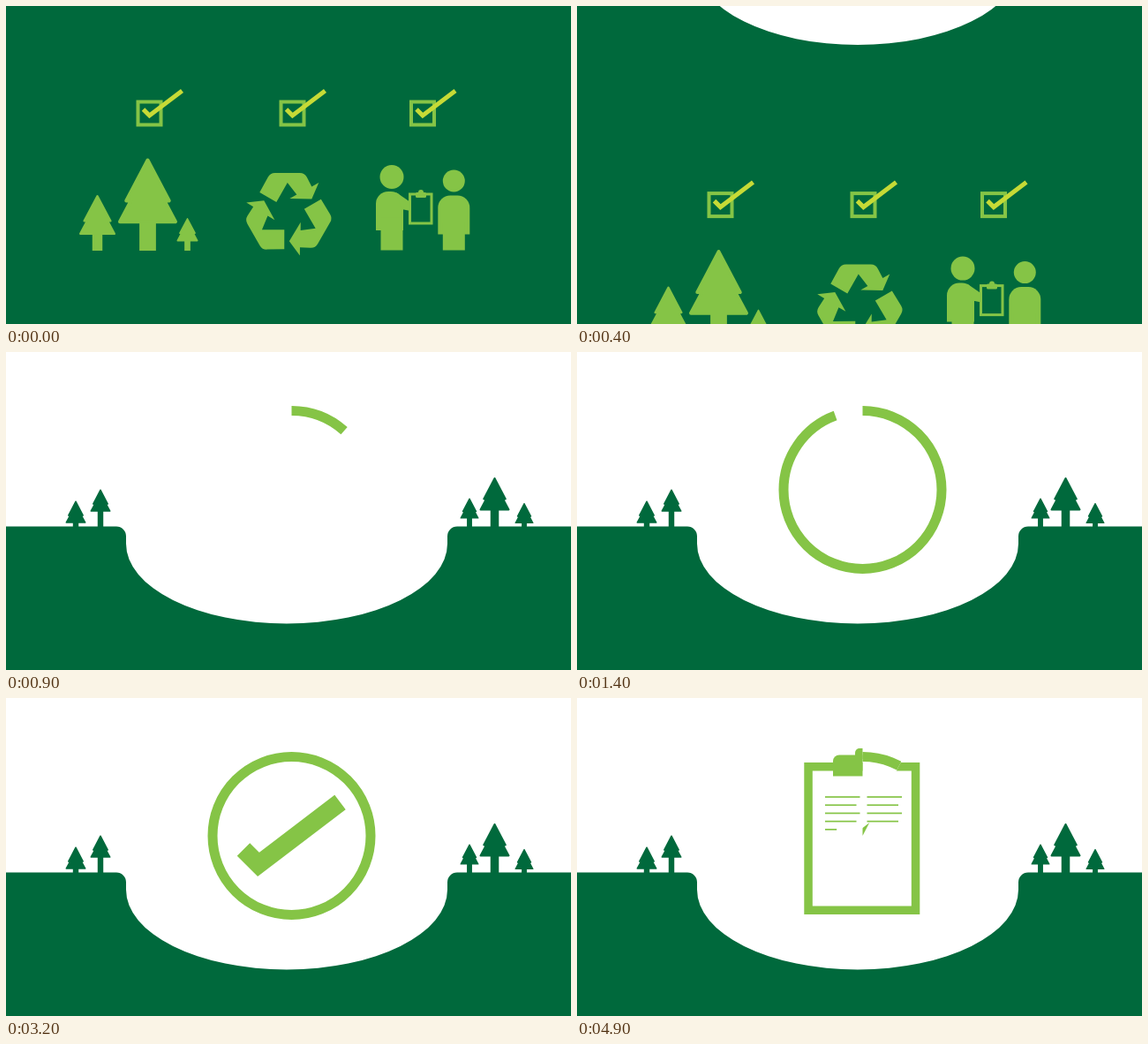
Write an HTML page with a canvas that moves like this. It is 640x360 px and loops after 5000 ms.

```html
<!DOCTYPE html>
<html lang="en">
<head>
<meta charset="utf-8">
<title>Forest, recycling, checklist</title>
<style>
  html, body { margin: 0; width: 100%; height: 100%; overflow: hidden; background: #fff; }
  canvas { display: block; width: 640px; height: 360px; }
</style>
</head>
<body>
<canvas id="stage" width="640" height="360"></canvas>
<script>
const ctx = document.getElementById('stage').getContext('2d');
const DARK = '#00693c', LIME = '#85c446', YELLOW = '#c6da36';
const LOOP = 5000, STEP = 100, SCROLL = 367, GROUND = 197.5, TAU = Math.PI * 2;
const HUB = { x: 323.5, y: 156 };

const clamp = v => Math.min(1, Math.max(0, v));
const easeCubic = u => u < 0.5 ? 4 * u ** 3 : 1 - 4 * (1 - u) ** 3;
const eased = (t, start, length) => easeCubic(clamp((t - start) / length));

function trace(points) {
  ctx.beginPath();
  points.forEach(([x, y]) => ctx.lineTo(x, y));
}

function line(points, color, width) {
  trace(points);
  ctx.strokeStyle = color;
  ctx.lineWidth = width;
  ctx.lineJoin = 'miter';
  ctx.stroke();
}

function frame(x, y, w, h, width) {
  ctx.strokeStyle = LIME;
  ctx.lineWidth = width;
  ctx.lineJoin = 'miter';
  ctx.strokeRect(x + width / 2, y + width / 2, w - width, h - width);
}

function box(x, y, w, h, radii = 0) {
  ctx.beginPath();
  ctx.roundRect(x, y, w, h, radii);
  ctx.fill();
}

function disc(x, y, r) {
  ctx.beginPath();
  ctx.arc(x, y, r, 0, TAU);
  ctx.fill();
}

// A two-tier fir; every proportion follows from its half width.
function tree(color, x, top, half, ground) {
  const edge = half * 0.06, crown = half * 2.2, trunk = half * 0.28;
  const side = dir => [[0, 0], [0.77, 0.66], [0.6, 0.66], [1, 1]]
    .map(([u, v]) => [x + dir * u * (half - edge), top + edge + v * (crown - 2 * edge)]);
  trace([...side(1), ...side(-1).reverse()]);
  ctx.closePath();
  ctx.fillStyle = ctx.strokeStyle = color;
  ctx.lineWidth = edge * 2;
  ctx.lineJoin = 'round';
  ctx.fill();
  ctx.stroke();
  ctx.fillRect(x - trunk, top + crown - 1, trunk * 2, ground - top - crown + 1);
}

function checkbox(x) {
  frame(x, 106.5, 30, 30, 4);
  line([[x + 8, 117], [x + 15, 124], [x + 52, 96]], YELLOW, 5);
}

function recycling() {
  ctx.fillStyle = LIME;
  for (let i = 0; i < 3; i++) {
    ctx.save();
    ctx.translate(319.8, 235);
    ctx.rotate(i * TAU / 3);
    ctx.beginPath();
    ctx.moveTo(-32.5, -24);
    ctx.arcTo(-20.5, -46, 18.5, -46, 9);
    ctx.arcTo(18.5, -46, 26.5, -30.5, 9);
    ctx.lineTo(26.5, -30.5);
    ctx.lineTo(34.5, -35);
    ctx.lineTo(26.5, -16.5);
    ctx.lineTo(1.5, -17);
    ctx.lineTo(9.5, -21.5);
    ctx.lineTo(-1, -35);
    ctx.lineTo(-13.5, -13);
    ctx.fill();
    ctx.restore();
  }
}

function person(x, headY, r, width) {
  ctx.fillStyle = LIME;
  disc(x, headY, r);
  box(x - 18, headY + 16.5, width, 44, [14, 14, 0, 0]);
  box(x - 12.5, headY + 46, 25, 276.5 - headY - 46);
}

function people() {
  person(437, 193.5, 13.5, 31);
  person(507.3, 198, 12.5, 36);
  trace([[442, 211], [458, 222], [458, 232], [448, 230]]);
  ctx.fill();
  ctx.fillStyle = DARK;
  box(456, 211, 28, 37, 2);
  frame(456, 211.5, 27.5, 36, 3);
  ctx.fillStyle = LIME;
  box(464, 211, 12, 6, 1.5);
  disc(470, 211, 3);
}

function icons() {
  [147.5, 309.5, 457].forEach(checkbox);
  tree(LIME, 160.5, 172.5, 33.5, 277);
  tree(LIME, 103.5, 214, 20.5, 277);
  tree(LIME, 205.5, 240, 12, 277);
  recycling();
  people();
}

function landscape() {
  ctx.fillStyle = DARK;
  ctx.beginPath();
  ctx.moveTo(-1, GROUND);
  ctx.arcTo(136, GROUND, 136, 217, 11);
  ctx.ellipse(318, 217, 182, 90.5, 0, Math.PI, 0, true);
  ctx.arcTo(500, GROUND, 641, GROUND, 11);
  ctx.lineTo(641, GROUND);
  ctx.lineTo(641, 760);
  ctx.lineTo(-1, 760);
  ctx.fill();
  tree(DARK, 79, 168.5, 11.5, GROUND + 1);
  tree(DARK, 107, 155.5, 11.5, GROUND + 1);
  tree(DARK, 525, 165.5, 10.5, GROUND + 1);
  tree(DARK, 553.5, 142, 17, GROUND + 1);
  tree(DARK, 587, 171, 10.5, GROUND + 1);
}

function badge(ringPart, checkPart) {
  if (ringPart > 0) {
    ctx.beginPath();
    ctx.arc(HUB.x, HUB.y, 89.5, -TAU / 4, -TAU / 4 + TAU * ringPart);
    ctx.strokeStyle = LIME;
    ctx.lineWidth = 11;
    ctx.stroke();
  }
  if (checkPart <= 0) return;
  const a = [269, 171.5], b = [286, 188.5], c = [378.5, 118];
  const first = Math.hypot(b[0] - a[0], b[1] - a[1]);
  const second = Math.hypot(c[0] - b[0], c[1] - b[1]);
  const drawn = checkPart * (first + second);
  const mix = (p, q, u) => p.map((v, i) => v + (q[i] - v) * u);
  const points = [a, mix(a, b, clamp(drawn / first))];
  if (drawn > first) points.push(mix(b, c, (drawn - first) / second));
  line(points, LIME, 20.5);
}

function clipboard() {
  frame(257.3, 73, 131, 172, 9.5);
  ctx.fillStyle = LIME;
  box(290, 64.5, 67, 24, [7, 7, 0, 0]);
  box(315, 57, 17, 12, [5, 5, 0, 0]);
}

function textLines(count) {
  ctx.fillStyle = LIME;
  for (let i = 0; i < count; i++) {
    const row = i >> 1, width = row % 2 ? 35.5 : 39.5;
    ctx.fillRect(i % 2 ? 328.5 : 281, 111.2 + row * 9.2, width * clamp(count - i), 1.7);
  }
}

// Clips to the wedge between two angles, measured clockwise from the top.
function inWedge(from, to, paint) {
  ctx.save();
  ctx.beginPath();
  ctx.moveTo(HUB.x, HUB.y);
  ctx.arc(HUB.x, HUB.y, 220, from - TAU / 4, to - TAU / 4);
  ctx.closePath();
  ctx.clip();
  paint();
  ctx.restore();
}

function draw(t) {
  const scroll = eased(t, 76, 784) * SCROLL;
  const wipe = eased(t, 3996, 1234);
  const paintBadge = () => badge(eased(t, 560, 1107), eased(t, 1600, 1000));
  ctx.fillStyle = '#fff';
  ctx.fillRect(0, 0, 640, 360);
  ctx.save();
  ctx.translate(0, scroll - SCROLL);
  landscape();
  if (wipe > 0) {
    const edge = TAU * (1 - wipe);
    inWedge(0, edge, paintBadge);
    inWedge(edge, TAU, clipboard);
    textLines((t - 4600) / 36);
  } else {
    paintBadge();
  }
  ctx.translate(0, SCROLL);
  icons();
  ctx.restore();
}

function tick() {
  const t = performance.now() % LOOP;
  draw(Math.floor(t / STEP) * STEP);
  requestAnimationFrame(tick);
}
tick();
</script>
</body>
</html>
```
